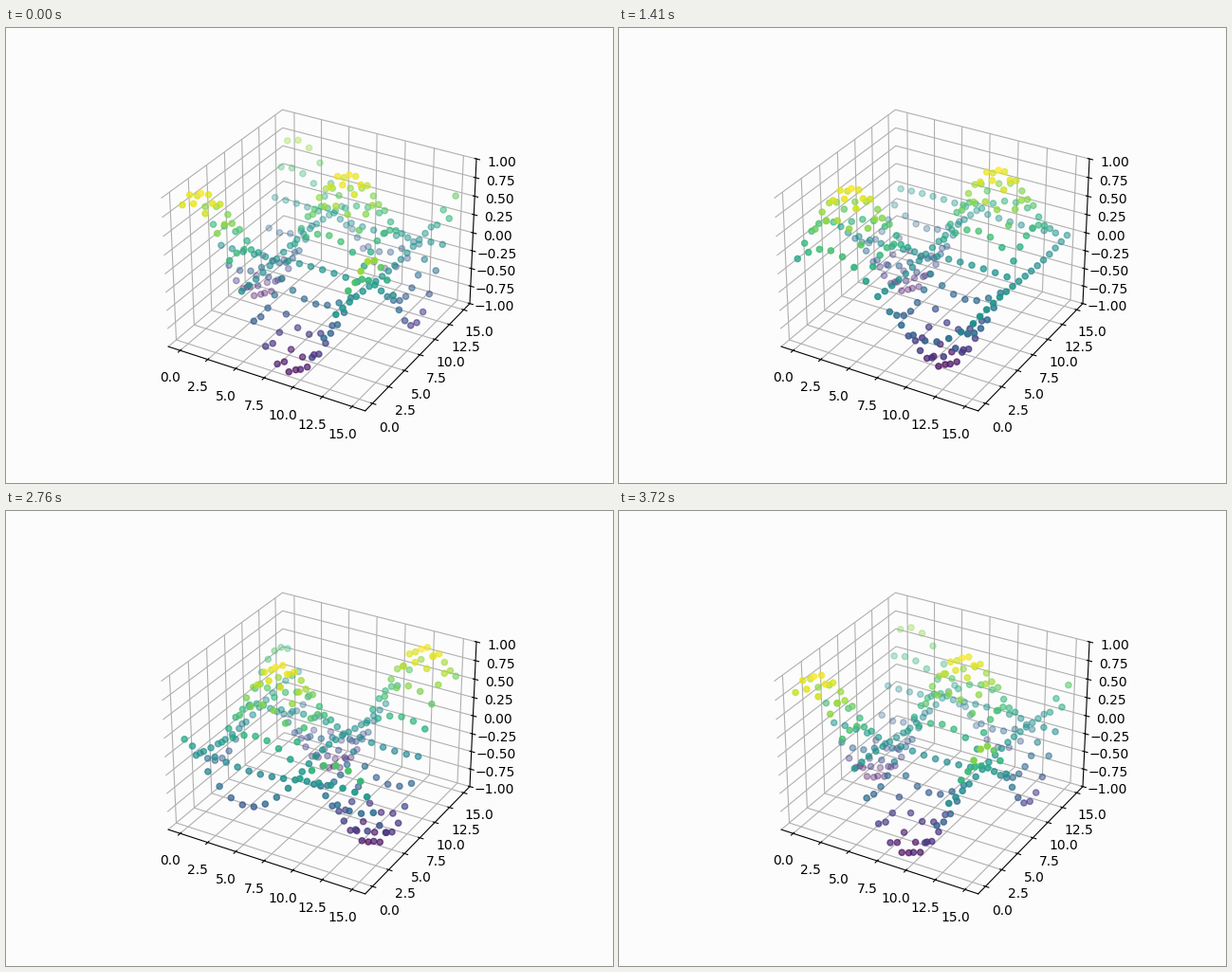
A matplotlib script that plays this animation: 640x480 px, repeating every 3.75 s.

```python
import numpy as np
import matplotlib.pyplot as plt
from matplotlib.animation import FuncAnimation

FRAMES = 125
INTERVAL = 30
SIZE = 16
STEP = 0.05
PHASE = -0.355
BACKGROUND = "#fcfcfc"

xs, ys = (g.ravel() for g in np.meshgrid(np.arange(SIZE), np.arange(SIZE)))
k = 2 * np.pi / SIZE

fig = plt.figure(figsize=(6.4, 4.8), dpi=100, facecolor=BACKGROUND)
ax = fig.add_subplot(projection="3d", facecolor=BACKGROUND)
ax.set_zlim(-1, 1)
for axis in (ax.xaxis, ax.yaxis, ax.zaxis):
    axis.set_pane_color(BACKGROUND)


def draw(i):
    """Show the egg-crate wave after i steps along the diagonal."""
    for old in list(ax.collections):
        old.remove()
    shift = PHASE + STEP * i
    zs = np.cos(k * xs + shift) * np.cos(k * ys + shift)
    return [ax.scatter(xs, ys, zs, c=zs, cmap="viridis")]


anim = FuncAnimation(fig, draw, frames=FRAMES, interval=INTERVAL,
                     repeat=True, repeat_delay=0, blit=False)
plt.show()
```
